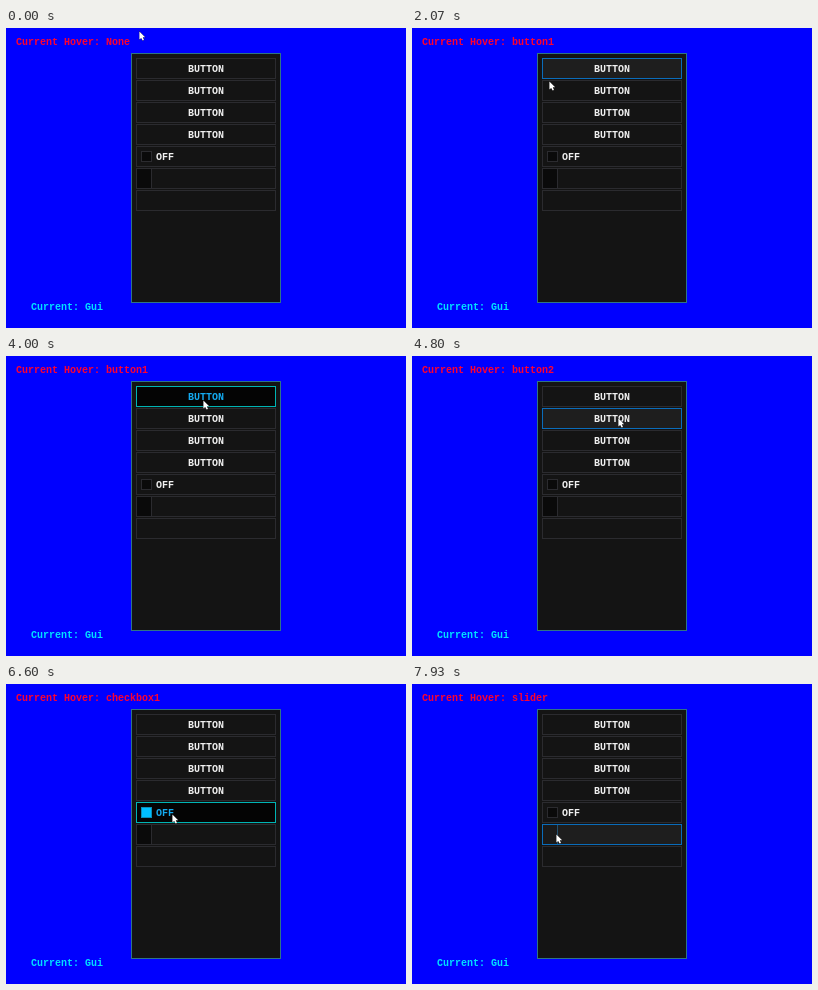
Animation, 400 px wide and 300 px high, one loop 8000 ms. Source, as an HTML page with a canvas:

```html
<!DOCTYPE html>
<html>
<head>
<meta charset="utf-8">
<style>
html, body { margin: 0; width: 100%; height: 100%; overflow: hidden; background: #00f; }
canvas { display: block; width: 400px; height: 300px; }
</style>
</head>
<body>
<canvas id="stage" width="400" height="300"></canvas>
<script>
const ctx = document.getElementById('stage').getContext('2d');
const LOOP = 8000, TICK = 1000 / 15;
const ROW = { x: 130, y: 30, w: 140, h: 21, step: 22 };
const NAMES = ['button1', 'button2', 'button3', 'button4', 'checkbox1', 'slider'];
const CHECKBOX = 4, SLIDER = 5;

// pointer stops; it leaves each one at tick "until"
const STOPS = [
  { x: 133, y: 3, at: 0, until: 18 },
  { x: 99, y: 22, at: 24, until: 24 },
  { x: 137, y: 53, at: 31, until: 31 },
  { x: 186, y: 42, at: 36, until: 46 },
  { x: 192, y: 63, at: 51, until: 51 },
  { x: 197, y: 44, at: 56, until: 66 },
  { x: 206, y: 62, at: 72, until: 78 },
  { x: 211, y: 111, at: 87, until: 89 },
  { x: 166, y: 130, at: 99, until: 109 },
  { x: 144, y: 150, at: 119, until: 120 }
];
const CLICKS = [60, 77, 90, 99, 106], CLICK_TICKS = 2;

function pointerAt(n) {
  const i = STOPS.findIndex(s => n <= s.until);
  const to = STOPS[i], from = STOPS[i - 1] || to;
  const k = n >= to.at ? 1 : (n - from.until) / (to.at - from.until);
  const mix = (a, b) => Math.round(a + (b - a) * k);
  return { x: mix(from.x, to.x), y: mix(from.y, to.y) };
}

// the interface trails the pointer by one tick and a few pixels
function rowAt(n) {
  const p = pointerAt(Math.max(0, n - 1));
  const dy = p.y - 3 - ROW.y;
  const inside = p.x >= ROW.x && dy >= 0 && dy % ROW.step < ROW.h;
  return inside ? Math.floor(dy / ROW.step) : -1;
}

function isChecked(n) {
  const done = CLICKS.filter(c => n >= c + CLICK_TICKS && rowAt(c) === CHECKBOX);
  return done.length % 2 === 1;
}

function fill(x, y, w, h, color) {
  ctx.fillStyle = color;
  ctx.fillRect(x, y, w, h);
}

function box(x, y, w, h, border, inner) {
  fill(x, y, w, h, border);
  fill(x + 1, y + 1, w - 2, h - 2, inner);
}

function text(s, x, y, color) {
  ctx.fillStyle = color;
  ctx.fillText(s, x, y);
}

const STYLES = {
  normal: { border: '#2b2b2f', base: '#141414', ink: '#f0f0f0', knob: '#0a0a0a' },
  hover: { border: '#0a6cba', base: '#1e1e1e', ink: '#f0f0f0', knob: '#1a1a1a' },
  pressed: { border: '#00b4b4', base: '#040404', ink: '#14aaf0', knob: '#00bfff' }
};

function drawRow(i, state, checked) {
  const { border, base, ink, knob } = STYLES[state];
  const y = ROW.y + ROW.step * i;
  box(ROW.x, y, ROW.w, ROW.h, border, base);
  if (i < CHECKBOX) text('BUTTON', 182, y + 14, ink);
  if (i === CHECKBOX) {
    if (state === 'pressed') box(135, y + 5, 11, 11, '#0c8cb4', knob);
    else box(135, y + 5, 11, 11, '#2b2b2f', '#0a0a0a');
    if (checked && state !== 'pressed') fill(137, y + 7, 7, 7, '#0a78c8');
    text(checked ? 'ON' : 'OFF', 150, y + 14, ink);
  }
  if (i === SLIDER) {
    fill(131, y + 1, 14, 19, knob);
    fill(145, y + 1, 1, 19, state === 'hover' ? '#24506e' : border);
  }
}

function drawPointer({ x, y }) {
  const pts = [[0, 0], [0, 8], [1.8, 6.5], [3.2, 9.2], [4.6, 8.5], [3.4, 5.8], [5.8, 5.8]];
  ctx.beginPath();
  for (const [dx, dy] of pts) ctx.lineTo(x + 0.4 + dx, y + 0.4 + dy);
  ctx.closePath();
  ctx.lineWidth = 0.8;
  ctx.strokeStyle = 'rgba(0,0,0,0.6)';
  ctx.stroke();
  ctx.fillStyle = '#fff';
  ctx.fill();
}

function draw(ms) {
  const n = Math.floor((ms + 4) / TICK);
  const hover = rowAt(n);
  const down = CLICKS.some(c => n >= c && n < c + CLICK_TICKS);
  ctx.font = 'bold 10px "Liberation Mono", monospace';
  fill(0, 0, 400, 300, '#00f');
  text('Current Hover: ' + (NAMES[hover] || 'None'), 10, 17, '#ff0030');
  text('Current: Gui', 25, 282, '#00e0ff');
  box(125, 25, 150, 250, '#2f7486', '#141414');
  for (let i = 0; i < 7; i++) {
    const state = i !== hover ? 'normal' : down ? 'pressed' : 'hover';
    drawRow(i, state, isChecked(n));
  }
  drawPointer(pointerAt(n));
}

const start = performance.now();
function loop() {
  draw((performance.now() - start) % LOOP);
  requestAnimationFrame(loop);
}
loop();
</script>
</body>
</html>
```
